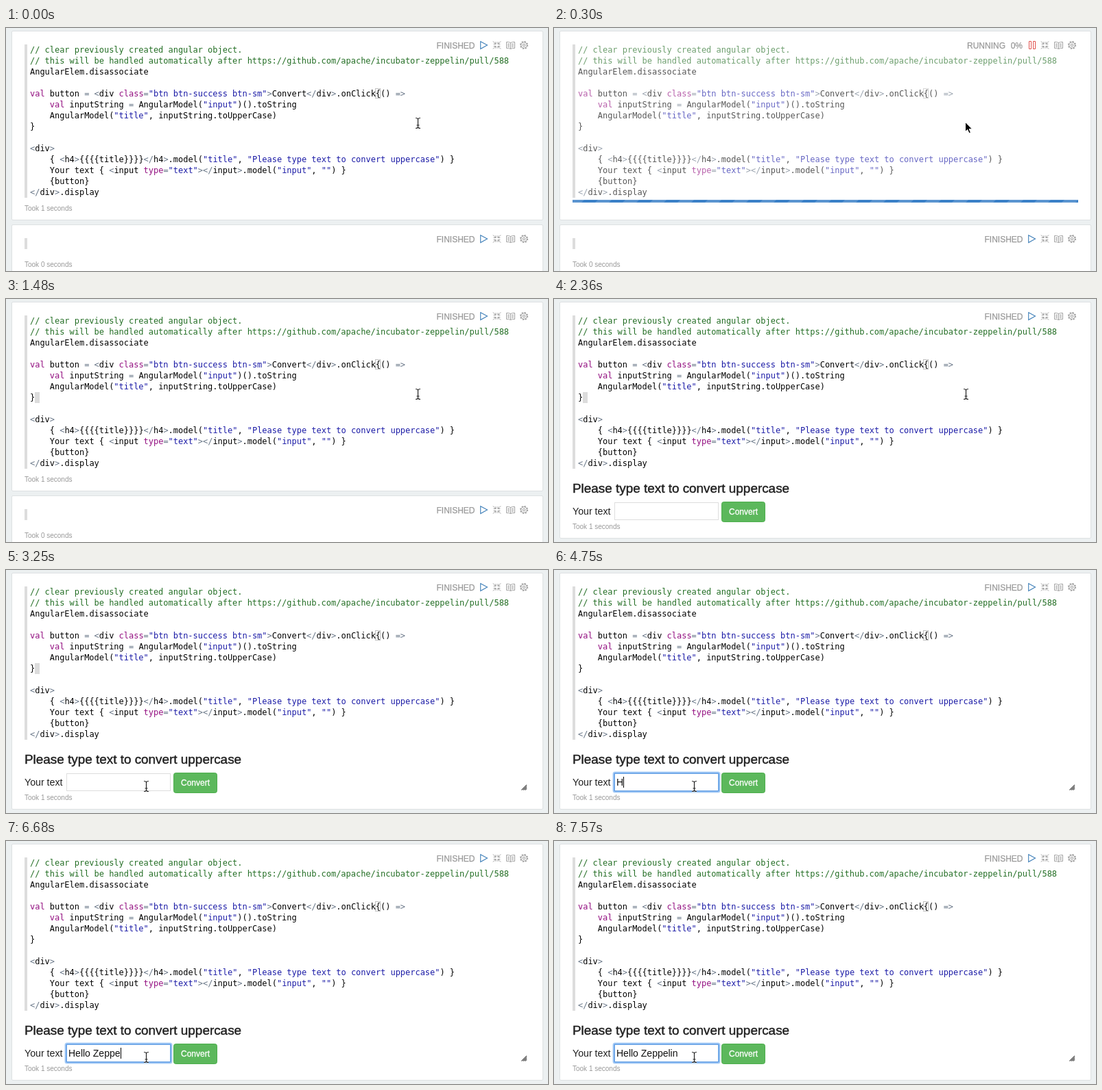
An HTML page for the animation above (8 s loop, 790 by 355 pixels).

```html
<!DOCTYPE html>
<html lang="en">
<head>
<meta charset="utf-8">
<title>Notebook paragraph</title>
<style>
  html, body { margin: 0; width: 100%; height: 100%; overflow: hidden; background: #ecf0f1; }
  svg { display: block; width: 790px; height: 355px; }
  text { font-family: "Liberation Sans", Arial, sans-serif; white-space: pre; }
  #code text { font: 11.96px "DejaVu Sans Mono", monospace; }
  .comment { fill: #236e24; }
  .key { fill: #930f80; }
  .str { fill: #1a1aa6; }
  .op { fill: #687687; }
  .panel { fill: #fff; stroke: #dde1e2; }
  .gutter { fill: #ddd; }
  .status { font-size: 12px; fill: #999; stroke: #999; stroke-width: .25; }
  .took { font-size: 10px; fill: #999; }
  .title { font-size: 18.9px; fill: #212121; stroke: #212121; stroke-width: .45; }
  .body { font-size: 14.2px; fill: #212121; }
  .typed { font-size: 14px; fill: #111; }
  .button { font-size: 12px; fill: #fff; stroke: #fff; stroke-width: .3; }
  .icon { fill: none; stroke: #999; }
  .play { fill: none; stroke: #3f7fb8; stroke-width: 1.1; }
  .pause { fill: none; stroke: #e0504c; }
</style>
</head>
<body>
<svg viewBox="0 0 790 355">
  <defs>
    <pattern id="stripes" width="40" height="40" y="251" patternUnits="userSpaceOnUse">
      <rect width="40" height="40" fill="#3a80c7"/>
      <path d="M0 0H10L0 10ZM30 0H40V10L10 40H0V30ZM40 30V40H30Z" fill="#fff" fill-opacity=".16"/>
    </pattern>
    <g id="tools" class="icon">
      <path d="M710 19.5l4 4m0-3.300v3.300h-3.300M721 19.500l-4 4m0-3.300v3.300h3.300M710 30.500l4-4m0 3.300v-3.300h-3.300M721 30.500l-4-4m0 3.300v-3.300h3.300"/>
      <path d="M735.500 21.500q-3-1.500-6-1v9q3-.500 6 1q3-1.500 6-1v-9q-3-.500-6 1zv9M731 23l3 .5M731 25l3 .5M731 27l3 .5M740 23l-3 .5M740 25l-3 .5M740 27l-3 .5" stroke-width=".9"/>
      <circle cx="755" cy="25" r="4.200"/>
      <circle cx="755" cy="25" r="5.200" stroke-width="1.600" stroke-dasharray="2 2.084"/>
      <circle cx="755" cy="25" r="1.700"/>
    </g>
    <g id="finished">
      <text class="status" x="683.500" y="30" text-anchor="end">FINISHED</text>
      <path class="play" d="M691.700 19.700L701.500 25L691.700 30.500Z"/>
    </g>
  </defs>

  <rect id="main" class="panel" x="8.500" y="4.500" width="774" height="276" rx="1.500"/>
  <rect class="gutter" x="27" y="24" width="4" height="224"/>
  <rect id="block" x="42" y="136" width="7" height="16" fill="#dcdcdc"/>
  <g id="code">
    <rect x="538.500" y="88.500" width="7" height="14" fill="none" stroke="#c0c0c0"/>
  </g>

  <use href="#tools"/>
  <use id="done" href="#finished"/>
  <g id="running">
    <text class="status" x="602" y="30">RUNNING</text>
    <text class="status" x="683" y="30" text-anchor="end">0%</text>
    <path class="pause" d="M692.500 19.500h3v11h-3zM698.500 19.500h3v11h-3z"/>
    <rect x="27" y="251" width="737" height="4" fill="url(#stripes)"/>
  </g>

  <g id="result">
    <text class="title" x="27" y="283">Please type text to convert uppercase</text>
    <text class="body" x="27" y="315">Your text</text>
    <rect x="88.500" y="297.500" width="151" height="25" fill="#fff" stroke="#ddd"/>
    <g id="focus" fill="none">
      <rect x="87" y="296" width="154" height="28" rx="2" stroke="#a9cdf6" stroke-width="3"/>
      <rect x="88" y="297" width="152" height="26" rx="1" stroke="#5f9fe8" stroke-width="1.600"/>
    </g>
    <text id="typed" class="typed" x="91" y="315"></text>
    <rect id="caret" y="302" width="1" height="16" fill="#000"/>
    <rect x="244.500" y="296.500" width="63" height="29" rx="3" fill="#5cb85c" stroke="#4cae4c"/>
    <text class="button" x="255" y="315">Convert</text>
    <path id="grip" d="M751.500 321.500l7.500-7.500M754 321.500l5-5M756.500 321.500l2.500-2.500" stroke="#555" stroke-width="1.300"/>
  </g>

  <g id="lower">
    <text id="took" class="took" x="27" y="267">Took 1 seconds</text>
    <rect class="panel" x="8.500" y="287.500" width="774" height="90" rx="1.500"/>
    <rect class="gutter" x="27" y="307" width="4" height="16"/>
    <g transform="translate(0 283)"><use href="#tools"/><use href="#finished"/></g>
    <text class="took" x="27" y="349">Took 0 seconds</text>
  </g>

  <path id="arrow" transform="translate(599.500 137.500)" d="M0 0V14L3.200 11L5.500 16.200L7.900 15.200L5.600 10.200H10Z" stroke="#fff"/>
  <g id="beam" fill="none">
    <path d="M-3.500-7.500Q-.500-7.500 0-6Q.500-7.500 3.500-7.500M0-6V6M-3.500 7.500Q-.500 7.500 0 6Q.500 7.500 3.500 7.500M-2 3H2" stroke="#fff" stroke-width="2.600" stroke-opacity=".7"/>
    <path d="M-3.500-7.500Q-.500-7.500 0-6Q.500-7.500 3.500-7.500M0-6V6M-3.500 7.500Q-.500 7.500 0 6Q.500 7.500 3.500 7.500M-2 3H2" stroke="#222" stroke-width="1.200"/>
  </g>
</svg>

<script>
const LOOP = 8000, NS = "http://www.w3.org/2000/svg";
const $ = id => document.getElementById(id);

const source = `// clear previously created angular object.
// this will be handled automatically after https://github.com/apache/incubator-zeppelin/pull/588
AngularElem.disassociate

val button = <div class="btn btn-success btn-sm">Convert</div>.onClick{() =>
    val inputString = AngularModel("input")().toString
    AngularModel("title", inputString.toUpperCase)
}

<div>
    { <h4>{{{{title}}}}</h4>.model("title", "Please type text to convert uppercase") }
    Your text { <input type="text"></input>.model("input", "") }
    {button}
</div>.display`;

const token = /(?<comment>\/\/ .*)|(?<str>"[^"]*")|(?<key>\b(?:val|class|type)\b)|(?<op>[<>=\/]+)|[^<>=\/"\s\w]+|\w+|\s+/g;

source.split("\n").forEach((line, i) => {
  const text = document.createElementNS(NS, "text");
  text.setAttribute("x", 35);
  text.setAttribute("y", 36 + 16 * i);
  for (const m of line.matchAll(token)) {
    const span = document.createElementNS(NS, "tspan");
    const kind = Object.keys(m.groups).find(k => m.groups[k]);
    if (kind) span.setAttribute("class", kind);
    span.textContent = m[0];
    text.append(span);
  }
  $("code").append(text);
});

// [time, letters typed]
const typing = [[4750, 1], [5050, 2], [5190, 4], [5490, 5], [5640, 6], [6090, 7],
                [6380, 9], [6680, 11], [6830, 12], [6980, 13], [7130, 14]];
// [time, x, y] of the pointer
const pointer = [[0, 600, 139], [2810, 560, 164], [2960, 390, 262], [3100, 245, 309], [3250, 204, 316]];

const latest = (steps, t) => steps.filter(s => s[0] <= t).pop();
const within = (t, a, b) => t >= a && t < b;
const show = (id, on) => $(id).setAttribute("visibility", on ? "inherit" : "hidden");

function draw(t) {
  const running = within(t, 150, 1330), open = t >= 1620, focused = t >= 3700;

  show("running", running);
  show("arrow", running);
  show("done", !running);
  show("beam", !running);
  show("took", !running);
  $("code").setAttribute("opacity", running ? .66 : 1);
  $("stripes").setAttribute("x", -20 * t / 1000);

  show("result", open);
  $("main").setAttribute("height", open ? 345 : 276);
  $("lower").setAttribute("transform", `translate(0 ${open ? 69 : 0})`);
  show("block", within(t, 1480, 1910) || within(t, 2360, 2810) || within(t, 3250, 3700));

  const [, x, y] = latest(pointer, t);
  $("beam").setAttribute("transform", `translate(${x + .5} ${y})`);
  show("grip", open && y > 250);

  const count = (latest(typing, t) || [0, 0])[1];
  const typed = $("typed"), word = "Hello Zeppelin".slice(0, count);
  if (typed.textContent !== word) typed.textContent = word;
  show("focus", focused);
  show("caret", within(t, 3700, 4150) || within(t, 4750, 7570));
  $("caret").setAttribute("x", Math.round(91 + (count ? typed.getComputedTextLength() : 0)));
}

const start = performance.now();
function tick() {
  draw((performance.now() - start) % LOOP);
  requestAnimationFrame(tick);
}
tick();
</script>
</body>
</html>
```
